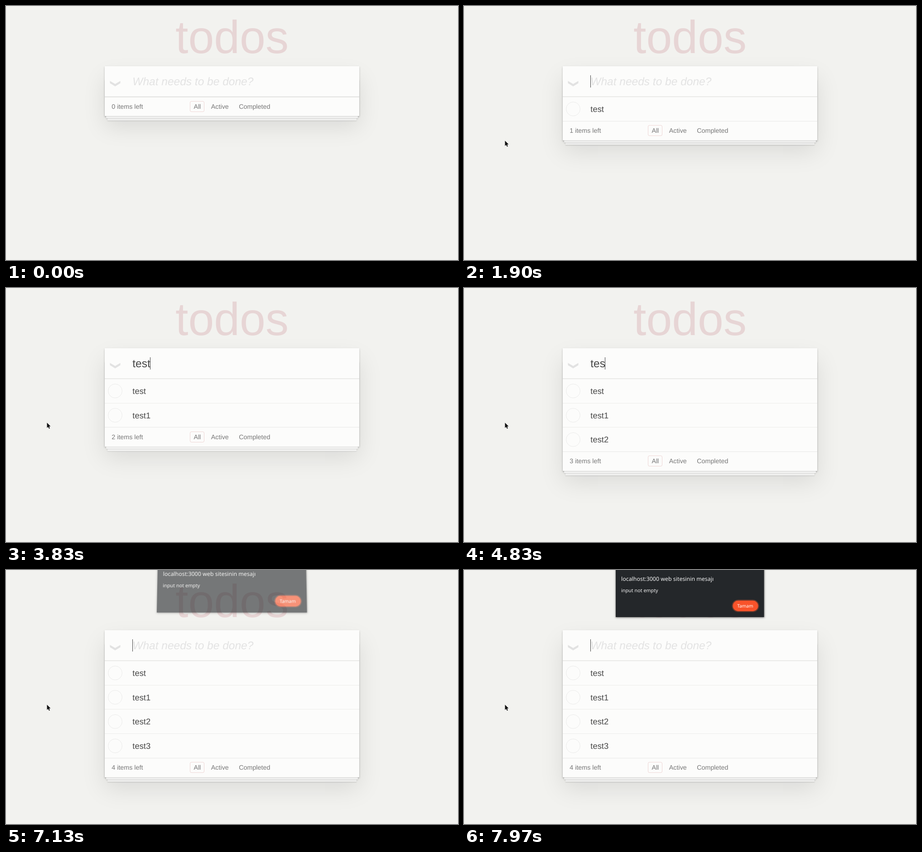
These frames come from a looping animation (998 px wide and 561 px high, 8000 ms). An HTML page with a canvas:

```html
<!DOCTYPE html>
<html lang="en">
<head>
<meta charset="utf-8">
<title>todos</title>
<style>
  html, body { margin: 0; width: 100%; height: 100%; overflow: hidden; background: #f2f2ef; }
  body { position: relative; }
  canvas { position: absolute; left: 0; top: 0; }
  #alert { top: -30px; transform-origin: 50% 30px; opacity: 0; }
</style>
</head>
<body>
<canvas id="app"></canvas>
<canvas id="alert"></canvas>
<script>
const W = 998, H = 561, LOOP = 8000;
const SANS = '"Liberation Sans", Arial, sans-serif';
const NOTO = '"Noto Sans", sans-serif';
const CARD = { x: 218, y: 133, w: 562 };
const ROW = 53.7, LIST_TOP = 200;
const ALERT_AT = 6980, ALERT_MS = 560, BLINK = 500;

// Key times for each line; the last one is Enter.
const lines = [
  ['test', [890, 980, 1070, 1160, 1560]],
  ['test1', [2000, 2100, 2190, 2290, 2600, 3050]],
  ['test2', [3500, 3600, 3690, 3790, 4050, 4350]],
  ['test3', [4600, 4700, 4790, 4900, 5350, 5950]],
  ['', [ALERT_AT]]
];

function context(id, w, h) {
  const c = document.getElementById(id), dpr = window.devicePixelRatio || 1;
  c.width = w * dpr;
  c.height = h * dpr;
  c.style.width = w + 'px';
  c.style.height = h + 'px';
  const g = c.getContext('2d');
  g.scale(dpr, dpr);
  g.textRendering = 'geometricPrecision';
  return g;
}

const g = context('app', W, H);
const ag = context('alert', W, 150);
const alertBox = document.getElementById('alert');

function text(c, str, x, y, font, color) {
  c.font = font;
  c.fillStyle = color;
  c.fillText(str, x, y);
}

function rect(x, y, w, h, color) {
  g.fillStyle = color;
  g.fillRect(x, y, w, h);
}

function pill(c, x, y, w, h, r) {
  c.beginPath();
  c.roundRect(x, y, w, h, r);
}

function polygon(points) {
  g.beginPath();
  points.forEach(([x, y]) => g.lineTo(x, y));
  g.closePath();
}

function setShadow(c, dy, blur, alpha) {
  const dpr = window.devicePixelRatio || 1;
  c.shadowColor = `rgba(0,0,0,${alpha})`;
  c.shadowOffsetY = dy * dpr;
  c.shadowBlur = blur * dpr;
}

function shadowRect(x, y, w, h, color, dy, blur, alpha) {
  g.save();
  setShadow(g, dy, blur, alpha);
  rect(x, y, w, h, color);
  g.restore();
}

const easeOut = p => 1 - (1 - Math.min(1, Math.max(0, p))) ** 3;

function stateAt(t) {
  const s = { items: [], input: '', lastKey: -1 };
  for (const [word, times] of lines) {
    const count = times.filter(k => k <= t).length;
    if (!count) break;
    s.lastKey = times[count - 1];
    const entered = count === times.length;
    if (entered && word) s.items.push(word);
    s.input = entered ? '' : word.slice(0, count);
  }
  return s;
}

function drawCard(bottom) {
  const { x, y, w } = CARD, h = bottom - y;
  shadowRect(x, y, w, h, '#fcfcfb', 25, 50, 0.1);
  shadowRect(x, y, w, h, '#fcfcfb', 2, 4, 0.2);
  for (const [inset, dy] of [[6, 16], [3, 8]]) {
    shadowRect(x + inset, y + 30, w - 2 * inset, h - 30 + dy - inset, '#f3f3f2', 1, 2, 0.15);
  }
  shadowRect(x, y + 30, w, h - 30, '#fcfcfb', 1, 2, 0.15);
  rect(x, y, w, h, '#fcfcfb');
}

function drawInput(s, t) {
  const font = `24.5px ${SANS}`;
  g.fillStyle = '#e2e2e2';
  polygon([[229.5, 165.5], [241, 172.3], [252.5, 165.5], [252.5, 170.5], [241, 177.5], [229.5, 170.5]]);
  g.fill();
  if (s.input) text(g, s.input, 279.3, 175, font, '#484848');
  else text(g, 'What needs to be done?', 279.3, 175, 'italic ' + font, '#e3e3e3');

  const blinkOn = Math.floor((t - s.lastKey) / BLINK) % 2 === 0;
  if (s.lastKey >= 0 && (blinkOn || t >= ALERT_AT)) {
    g.font = font;
    const width = s.input ? g.measureText(s.input).width : 0;
    rect(Math.floor(279.3 + width), 153, 1, 27, '#404040');
  }
  rect(CARD.x, 199, CARD.w, 1, '#f5f5f4');
  rect(CARD.x, LIST_TOP, CARD.w, 1, '#dfdfdc');
}

function drawItems(items) {
  items.forEach((name, i) => {
    const y = LIST_TOP + ROW * i;
    g.strokeStyle = '#ebebea';
    g.lineWidth = 1;
    g.beginPath();
    g.arc(241, y + 27.4, 15.4, 0, 2 * Math.PI);
    g.stroke();
    text(g, name, 279.3, Math.round(y + 34), `18.4px ${SANS}`, '#484848');
    const last = i === items.length - 1;
    rect(CARD.x, Math.round(y + ROW), CARD.w, 1, last ? '#e7e7e6' : '#ececea');
  });
}

function drawFooter(count) {
  const font = `14.3px ${SANS}`, color = '#777';
  const mid = count ? 221.2 + ROW * count : 222;
  const base = Math.round(mid + 5);
  if (!count) rect(CARD.x, LIST_TOP + 1, CARD.w, 1, '#ebebea');
  text(g, `${count} items left`, 233.3, base, font, color);
  text(g, 'All', 414.4, base, font, color);
  text(g, 'Active', 452.8, base, font, color);
  text(g, 'Completed', 514.2, base, font, color);
  g.strokeStyle = 'rgba(175,47,47,0.18)';
  g.lineWidth = 1;
  pill(g, 406.5, Math.round(mid - 12) + 0.5, 31, 23, 3);
  g.stroke();
}

function drawPointer(t) {
  const p = easeOut((t - 120) / 600);
  if (p <= 0) return;
  g.save();
  g.translate(-10 + 100 * p, 303 - 6 * p);
  polygon([[0.5, 0.5], [0.5, 12], [3.1, 9.7], [5, 13.8], [6.9, 13], [5.1, 9], [8.4, 8.6]]);
  g.strokeStyle = 'rgba(255,255,255,0.5)';
  g.lineWidth = 1;
  g.stroke();
  g.fillStyle = '#111';
  g.fill();
  g.restore();
}

function drawAlert() {
  ag.translate(0, 30);
  ag.save();
  setShadow(ag, 1, 4, 0.55);
  ag.fillStyle = '#24272a';
  ag.fillRect(335, -30, 327.5, 134);
  ag.restore();
  text(ag, 'localhost:3000 web sitesinin mesajı', 347, 24, `12.4px ${NOTO}`, '#f4f4f4');
  text(ag, 'input not empty', 347, 49, `10.8px ${NOTO}`, '#f4f4f4');
  ag.fillStyle = '#f9532a';
  pill(ag, 593.5, 67.5, 56, 23.5, 11.75);
  ag.fill();
  ag.strokeStyle = '#84402c';
  ag.lineWidth = 1.3;
  pill(ag, 592.3, 66.3, 58.4, 25.9, 13);
  ag.stroke();
  text(ag, 'Tamam', 603.2, 82.5, `10.2px ${NOTO}`, '#fff');
}

function poseAlert(t) {
  const shown = easeOut((t - ALERT_AT) / ALERT_MS), left = 1 - shown;
  alertBox.style.opacity = shown;
  alertBox.style.transform = left
    ? `translateY(${-28 * left}px) perspective(800px) rotateX(${14 * left}deg)`
    : 'none';
}

function render(t) {
  const s = stateAt(t), count = s.items.length;
  rect(0, 0, W, H, '#f2f2ef');
  g.textAlign = 'center';
  text(g, 'todos', 499, 104, `102.2px ${SANS}`, '#e7d5d5');
  g.textAlign = 'left';
  drawCard(242.8 + ROW * count);
  drawInput(s, t);
  drawItems(s.items);
  drawFooter(count);
  drawPointer(t);
  poseAlert(t);
}

drawAlert();
const start = performance.now();
function tick() {
  render((performance.now() - start) % LOOP);
  requestAnimationFrame(tick);
}
tick();
</script>
</body>
</html>
```
